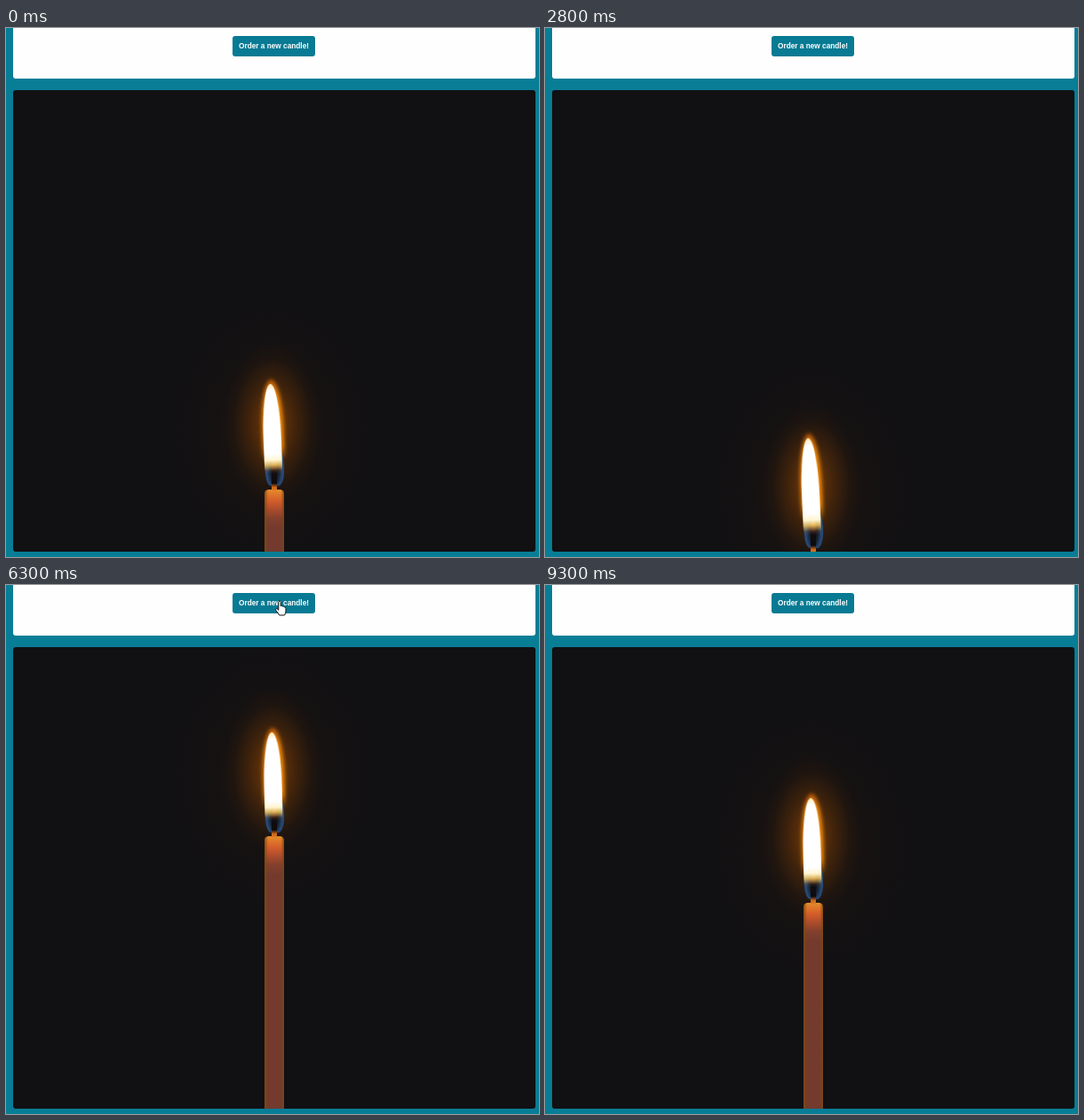
Write an HTML page that moves like this. It is 600x596 px and loops after 9.4 s.

```html
<!DOCTYPE html>
<html lang="en">
<head>
<meta charset="utf-8">
<title>Candle</title>
<style>
  html, body { margin: 0; width: 100%; height: 100%; overflow: hidden; background: #087d96; }
  #stage { position: relative; width: 600px; height: 596px; overflow: hidden; background: #087d96; }
  #stage div, #cursor { position: absolute; }
  #stage .sheet { left: 8px; top: -10px; width: 588px; height: 67px; background: #fffeff; border-radius: 0 0 3px 3px; }
  #stage .button {
    left: 255px; top: 9px; width: 93px; height: 23px; border-radius: 3px; background: #087a93;
    color: #fff; font: bold 8.27px/23px "Liberation Sans", Arial, sans-serif;
    text-align: center; white-space: nowrap;
  }
  #stage .panel { left: 8px; top: 70px; width: 588px; height: 520px; border-radius: 3px; overflow: hidden; background: #111013; }
  /* zero-size anchor at the middle of the candle's top edge */
  #candle { left: 294px; top: 0; width: 0; height: 0; }
  .aura {
    left: -118px; top: -215px; width: 232px; height: 310px;
    background:
      radial-gradient(ellipse 54px 92px at 50% 45%, rgba(190,88,0,.55), rgba(150,70,0,.27) 50%, rgba(110,50,0,.08) 80%, transparent),
      radial-gradient(ellipse 116px 150px at 50% 48%, rgba(95,48,0,.26), rgba(60,32,0,.1) 55%, transparent);
  }
  .wax {
    left: -11.5px; top: 0; width: 22.5px; height: 600px; border-radius: 5px 5px 0 0 / 4px 4px 0 0;
    background:
      linear-gradient(90deg, rgba(122,74,16,.9), rgba(122,74,16,0) 18%, rgba(122,74,16,0) 84%, rgba(122,74,16,.9)),
      linear-gradient(#e08f2c 0, #df742a 6px, #d35c2b 13px, #a94b2c 23px, #84402d 32px, #733a2d 44px);
  }
  .blue {
    left: -10.5px; top: -48px; width: 21px; height: 44px; border-radius: 50% 50% 35% 35%;
    background: #15161d;
    box-shadow: inset 4px 0 4px #2b5180, inset -4px 0 4px #2b5180, 0 0 3px rgba(30,50,85,.6);
  }
  .wick {
    left: -3px; top: -36px; width: 6px; height: 37px; border-radius: 40% 40% 0 0;
    background: linear-gradient(#c48638, #3f2027 25%, #100e12 45%, #0c0b0e 78%, #c9651c 90%, #d97a22);
  }
  #flame { left: -10px; bottom: 0; width: 20px; transform-origin: 50% 100%; }
  .halo {
    left: -1.5px; right: -2.5px; top: -5px; bottom: 26%; border-radius: 50% 50% 20% 20% / 60% 60% 10% 10%;
    background: linear-gradient(#b85708, #ef8808 20%, #f08a08 80%, rgba(220,120,0,0));
    filter: blur(2.2px);
  }
  .core {
    inset: 0; border-radius: 50% 50% 20% 20%;
    background: linear-gradient(#ffe9b8, #fff 7%, #fff 66%, #fff6d2 72%, rgba(255,205,95,.8) 77%, rgba(210,120,30,.15) 82%, transparent 85%);
    filter: blur(.6px);
  }
  #cursor { left: 0; top: 0; overflow: visible; }
  #cursor path { fill: #fff; stroke: #111; stroke-width: 1; stroke-linejoin: round; }
</style>
</head>
<body>
<div id="stage">
  <div class="sheet"></div>
  <div class="button">Order a new candle!</div>
  <div class="panel">
    <div id="candle">
      <div class="aura"></div>
      <div class="blue"></div>
      <div class="wax"></div>
      <div class="wick"></div>
      <div id="flame"><div class="halo"></div><div class="core"></div></div>
    </div>
  </div>
  <svg id="cursor" width="16" height="20">
    <path id="hand" d="M-1.2 8.5V1.2Q-1.2 0 0 0T1.2 1.2V5.6Q2.6 4.9 3.4 6.1Q4.8 5.6 5.4 6.9Q7 6.7 7 8.4V11.2Q7 13.4 5.6 16H-.4Q-1.6 13.5-4.2 10.6Q-4.9 9.4-3.8 8.8Q-2.6 8.5-1.2 10.3Z"/>
    <path id="arrow" d="M0 0V12.5L2.9 9.8L4.8 14.2L6.7 13.4L4.8 9.1H8.7Z"/>
  </svg>
</div>
<script>
  const LOOP = 9400, STEP = 100, SINK = 0.025;
  const $ = id => document.getElementById(id);
  const [candle, flame, cursor, hand, arrow] = ['candle', 'flame', 'cursor', 'hand', 'arrow'].map($);

  // top: wax edge on the stage at time 0; tall / left: times of highest and leftmost flame
  const candles = [
    { from: 0, to: 4700, top: 520, tall: 2200, left: 2800 },
    { from: 6200, to: LOOP, top: 125.5, tall: 7900, left: 7800 }
  ];

  // time, x, y of the pointer
  const trail = [
    [5000, 422, 78], [5300, 340, 42], [5500, 243, 4], [5800, 300, 16],
    [6000, 308, 18], [7000, 308, 18], [7300, 306, -24]
  ];

  const wave = (t, peak, period) => Math.cos((t - peak) / period * 2 * Math.PI);

  function drawCandle(t) {
    const c = candles.find(c => t >= c.from && t < c.to);
    candle.style.display = c ? 'block' : 'none';
    if (!c) return;
    const height = 124.5 + 7.5 * wave(t, c.tall, 3500);
    const lean = 4.2 + 1.6 * wave(t, c.left, 3600);
    candle.style.transform = `translateY(${c.top + t * SINK - 70}px)`;
    flame.style.height = height + 'px';
    flame.style.transform = `rotate(${-Math.asin(lean / height)}rad)`;
  }

  function drawCursor(t) {
    const i = trail.findIndex(p => p[0] > t);
    cursor.style.display = i > 0 ? 'block' : 'none';
    if (i < 1) return;
    const [t0, x0, y0] = trail[i - 1], [t1, x1, y1] = trail[i];
    const k = (t - t0) / (t1 - t0);
    const x = x0 + (x1 - x0) * k, y = y0 + (y1 - y0) * k;
    const over = x > 255 && x < 348 && y > 9 && y < 32;
    hand.style.display = over ? 'inline' : 'none';
    arrow.style.display = over ? 'none' : 'inline';
    cursor.style.transform = `translate(${x}px, ${y}px)`;
  }

  const start = performance.now();
  function draw() {
    const t = Math.floor((performance.now() - start) % LOOP / STEP) * STEP;
    drawCandle(t);
    drawCursor(t);
    requestAnimationFrame(draw);
  }
  draw();
</script>
</body>
</html>
```
